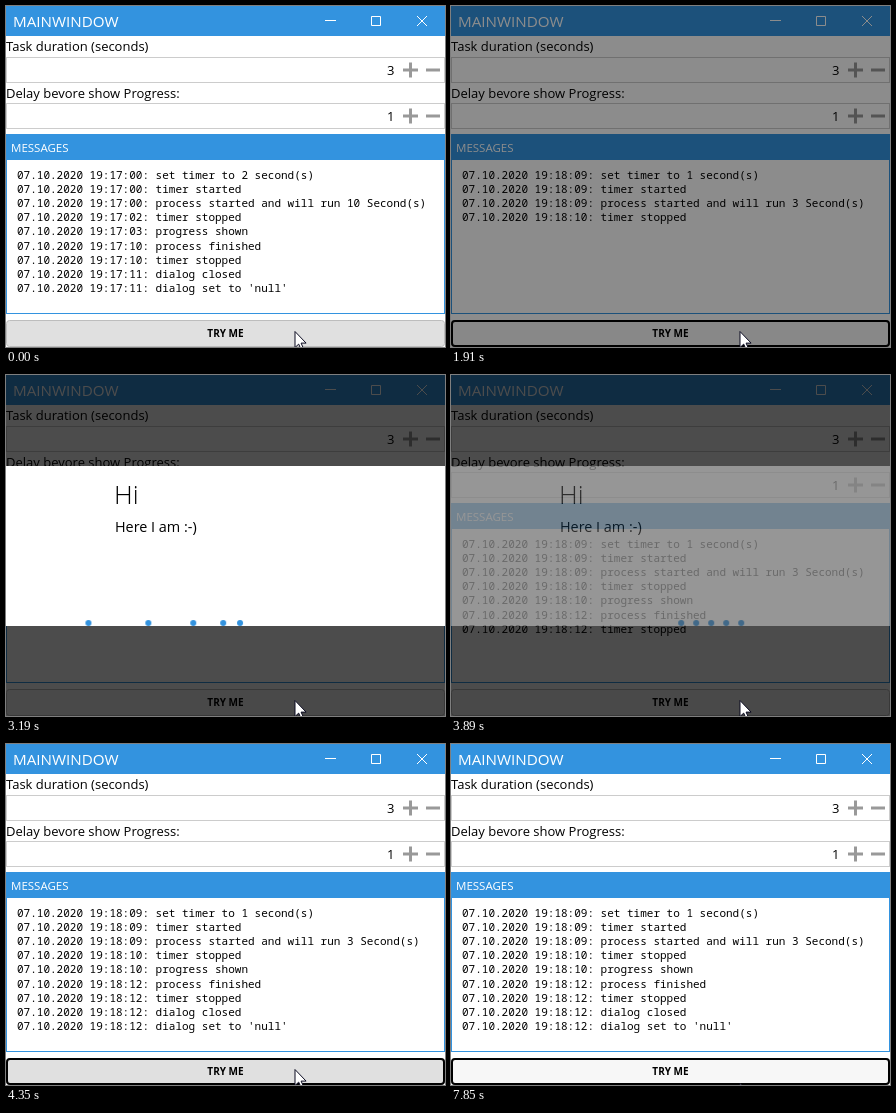
An HTML page that plays this animation: 439 px wide and 341 px high, repeating every 8 s.

```html
<!DOCTYPE html>
<html lang="en">
<head>
<meta charset="utf-8">
<title>Progress dialog</title>
<style>
  html, body { margin: 0; width: 100%; height: 100%; overflow: hidden; background: #fff; }
  svg { display: block; width: 100%; height: 100%; }
  text { font-family: "Open Sans", "Noto Sans", sans-serif; font-size: 13px; fill: #000; white-space: pre; }
  .accent { fill: #3393df; }
  .title { font-size: 15.2px; fill: #fff; }
  .head { font-size: 11.5px; fill: #fff; }
  .num { text-anchor: end; }
  .log text { font-family: "Noto Sans Mono", "DejaVu Sans Mono", monospace; font-size: 11px; }
  .caption { font-size: 10px; font-weight: 700; text-anchor: middle; }
  .hi { font-size: 26px; font-weight: 300; }
  .line { fill: none; stroke: #fff; }
  .box { fill: #fff; stroke: #ccc; }
  .sign { fill: none; stroke: #999; stroke-width: 3; }

  .old, .start, .stop, .shown, .done, .closed, .face, .focus, .cursor {
    animation: 8s step-end infinite both;
  }
  .old { animation-name: old; }
  .start { animation-name: start; }
  .stop { animation-name: stop; }
  .shown { animation-name: shown; }
  .done { animation-name: done; }
  .closed { animation-name: closed; }
  .face { animation-name: face; }
  .focus { animation-name: focus; fill: none; stroke: #000; stroke-width: 2; }
  .cursor { animation-name: leave; }
  .shade { animation: shade 8s linear infinite both; }
  .dialog { animation: dialog 8s linear infinite both; }
  .dot { animation: run 8s linear infinite both; }

  @keyframes old { 0% { opacity: 1 } 8.5%, to { opacity: 0 } }
  @keyframes start { 0% { opacity: 0 } 8.5%, to { opacity: 1 } }
  @keyframes stop { 0% { opacity: 0 } 21.99%, to { opacity: 1 } }
  @keyframes shown { 0% { opacity: 0 } 25%, to { opacity: 1 } }
  @keyframes done { 0% { opacity: 0 } 44.75%, to { opacity: 1 } }
  @keyframes closed { 0% { opacity: 0 } 54.3%, to { opacity: 1 } }
  @keyframes face {
    0% { fill: #e0e0e0 }
    8.5% { fill: #d0d0d0 }
    9.5% { fill: #e0e0e0 }
    21.99% { fill: #f7f7f7 }
    54.3% { fill: #e0e0e0 }
    98.1%, to { fill: #f7f7f7 }
  }
  @keyframes focus {
    0% { opacity: 0 }
    9.5% { opacity: 1 }
    25% { opacity: 0 }
    54.3%, to { opacity: 1 }
  }
  @keyframes leave {
    0% { transform: none }
    97.1% { transform: translateY(7px) }
    98.1%, to { transform: translateY(14px) }
  }
  @keyframes shade {
    0%, 21.875% { opacity: 0 }
    25%, 51.25% { opacity: .7 }
    54.3%, to { opacity: 0 }
  }
  @keyframes dialog {
    0%, 25% { opacity: 0 }
    31.25%, 45% { opacity: 1 }
    51.25%, to { opacity: 0 }
  }
  /* slow down, drift at 80 px/s, speed up again */
  @keyframes run {
    0% { transform: translateX(-18.3px) }
    27.49% { transform: translateX(-18.3px); animation-timing-function: cubic-bezier(.333, .569, .667, .902) }
    38.71% { transform: translateX(226.5px) }
    48.99% { transform: translateX(292.5px); animation-timing-function: cubic-bezier(.333, .098, .667, .431) }
    60.2%, to { transform: translateX(537.3px) }
  }
</style>
</head>
<body>
<svg viewBox="0 0 439 341">
  <rect class="accent" width="439" height="30"/>
  <text class="title" x="7" y="21">MAINWINDOW</text>
  <path class="line" d="M319 14.5h11M365.5 10.5h9v9h-9zM411 10l10 10M421 10l-10 10"/>

  <text x="0" y="45">Task duration (seconds)</text>
  <rect class="box" x=".5" y="51.5" width="438" height="25"/>
  <text class="num" x="388.5" y="69">3</text>
  <path class="sign" d="M397 64h15M404.5 56.5v15M420 64h14"/>

  <text x="0" y="92">Delay bevore show Progress:</text>
  <rect class="box" x=".5" y="97.5" width="438" height="25"/>
  <text class="num" x="388.5" y="115">1</text>
  <path class="sign" d="M397 110h15M404.5 102.5v15M420 110h14"/>

  <rect x=".5" y="128.5" width="438" height="179" fill="#fff" stroke="#3393df"/>
  <rect class="accent" y="128" width="439" height="26"/>
  <text class="head" x="5" y="146">MESSAGES</text>
  <g class="log" id="log"></g>

  <rect class="face" x=".5" y="314.5" width="438" height="26" rx="3" stroke="#bdbdbd"/>
  <rect class="focus" x="1" y="315" width="437" height="25" rx="3"/>
  <text class="caption" x="219.5" y="331">TRY ME</text>

  <rect class="shade" width="439" height="341"/>
  <g class="dialog">
    <rect y="91" width="439" height="160" fill="#fff"/>
    <text class="hi" x="108" y="129">Hi</text>
    <text x="109" y="157" style="font-size:14.4px">Here I am :-)</text>
    <g id="dots"></g>
  </g>

  <path class="cursor" d="M289 325.5v16l3.7-3.4 2.6 5.9 2.4-1-2.6-5.9h5z" fill="#fff" stroke="#0a0a20"/>
</svg>
<script>
  const make = (parent, tag, attrs, text = '') => {
    const el = document.createElementNS('http://www.w3.org/2000/svg', tag);
    for (const key in attrs) el.setAttribute(key, attrs[key]);
    el.textContent = text;
    document.getElementById(parent).append(el);
    return el;
  };

  const before = [
    ['17:00', 'set timer to 2 second(s)'],
    ['17:00', 'timer started'],
    ['17:00', 'process started and will run 10 Second(s)'],
    ['17:02', 'timer stopped'],
    ['17:03', 'progress shown'],
    ['17:10', 'process finished'],
    ['17:10', 'timer stopped'],
    ['17:11', 'dialog closed'],
    ['17:11', "dialog set to 'null'"]
  ];
  const after = [
    ['18:09', 'set timer to 1 second(s)', 'start'],
    ['18:09', 'timer started', 'start'],
    ['18:09', 'process started and will run 3 Second(s)', 'start'],
    ['18:10', 'timer stopped', 'stop'],
    ['18:10', 'progress shown', 'shown'],
    ['18:12', 'process finished', 'done'],
    ['18:12', 'timer stopped', 'done'],
    ['18:12', 'dialog closed', 'closed'],
    ['18:12', "dialog set to 'null'", 'closed']
  ];
  for (const list of [before, after])
    list.forEach(([time, message, name = 'old'], i) =>
      make('log', 'text', { x: 11, y: Math.round(173 + 14.1 * i), class: name },
        `07.10.2020 19:${time}: ${message}`));

  for (let i = 0; i < 5; i++)
    make('dots', 'circle', { cy: 248, r: 3, class: 'dot accent' }).style.animationDelay = i * 187 + 'ms';
</script>
</body>
</html>
```
